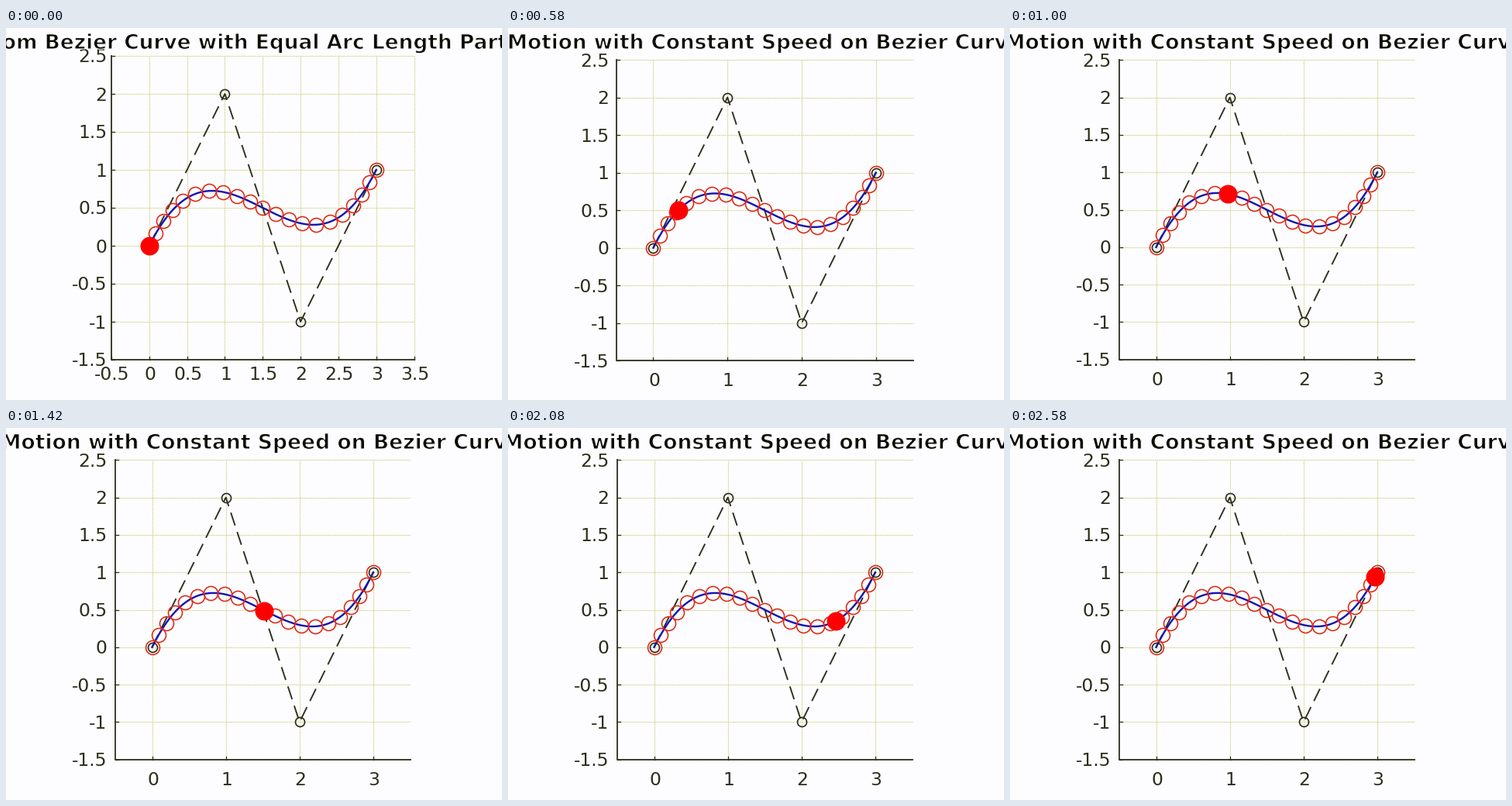
Animation, 640 px wide and 480 px high, one loop 2660 ms. Source, as a matplotlib script:

```python
import numpy as np
import matplotlib.pyplot as plt
from matplotlib.animation import FuncAnimation
from matplotlib.patheffects import Normal, Stroke

W, H, DPI = 640, 480, 100
LOOP_MS, TICK_MS = 2660, 20
POSE_MS = 250 / 3
PX = 72 / DPI  # points per pixel

BACK, INK, GRID = "#fdfdff", "#2e2e1c", "#d4d488"
BLUE, RING, BALL = "#1414b4", "#de2814", "#ff0000"
CONTROL = np.array([[0, 0], [1, 2], [2, -1], [3, 1]], float)

plt.rcParams["font.family"] = "DejaVu Sans"
fig = plt.figure(figsize=(W / DPI, H / DPI), dpi=DPI, facecolor=BACK)
ax = fig.add_axes([0, 0, 1, 1])
ax.set_xlim(0, W)
ax.set_ylim(H, 0)
ax.axis("off")

# Thins the bold title a little.
LIGHTER = [Normal(), Stroke(linewidth=1.1 * PX, foreground=BACK)]


def bezier(t):
    t = np.asarray(t, float)[..., None]
    s = 1 - t
    p0, p1, p2, p3 = CONTROL
    return s**3 * p0 + 3 * s**2 * t * p1 + 3 * s * t**2 * p2 + t**3 * p3


T = np.linspace(0, 1, 2001)
PATH = bezier(T)
ARC = np.concatenate([[0], np.cumsum(np.hypot(*np.diff(PATH, axis=0).T))])
ARC /= ARC[-1]


def at_length(part):
    """Point on the curve after the given share of its length."""
    return bezier(np.interp(part, ARC, T))


class Plot:
    """One layout of the chart; left, right, bottom, top are in pixels."""

    def __init__(self, box, title, title_x, title_px, step, label_y):
        self.left, self.right, self.bottom, self.top = box
        self.parts = []
        self.draw_axes(step, label_y)
        self.draw_curve()
        self.text(title_x, 27, title, title_px, "center", weight="bold",
                  color="#0c0c04", path_effects=LIGHTER)

    def pixel(self, points):
        x, y = np.asarray(points, float).T
        return (self.left + (x + 0.5) / 4 * (self.right - self.left),
                self.bottom + (y + 1.5) / 4 * (self.top - self.bottom))

    def line(self, x, y, color, width, **style):
        self.parts += ax.plot(x, y, color=color, lw=width * PX, **style)

    def text(self, x, y, label, size, align, **style):
        style.setdefault("color", INK)
        self.parts.append(ax.text(x, y, label, fontsize=size * PX, ha=align,
                                  va="baseline", **style))

    def rings(self, points, radius, color, width):
        x, y = self.pixel(points)
        self.line(x, y, color, 0, ls="", marker="o", ms=2 * radius * PX,
                  mfc="none", mew=width * PX)

    def draw_axes(self, step, label_y):
        l, r, b, t = self.left, self.right, self.bottom, self.top
        dots = dict(ls=(0, (1.2, 0.8)), dash_capstyle="butt")
        ticks_x = np.arange(-0.5, 3.6, 0.5) if step < 1 else np.arange(4)
        ticks_y = np.arange(-1.5, 2.6, 0.5)
        xs = self.pixel([(v, 0) for v in ticks_x])[0]
        ys = self.pixel([(0, v) for v in ticks_y])[1]
        for x in xs:
            self.line([x, x], [b, t], GRID, 1.2, **dots)
        for y in ys:
            self.line([l, r], [y, y], GRID, 1.2, **dots)
        self.line([l, l, r], [t, b, b], INK, 1.8)
        for x, v in zip(xs, ticks_x):
            self.line([x, x], [b, b - 4], INK, 1.3)
            self.text(x + 1, label_y, f"{v:g}", 23.5, "center")
        for y, v in zip(ys, ticks_y):
            self.line([l, l + 4], [y, y], INK, 1.3)
            self.text(130.5, y + 8.5, f"{v:g}", 23.5, "right")

    def draw_curve(self):
        self.line(*self.pixel(CONTROL), INK, 1.9, ls=(0, (9.2, 4.6)),
                  dash_capstyle="butt")
        self.line(*self.pixel(PATH), BLUE, 2.4)
        self.rings(at_length(np.linspace(0, 1, 21)), 9, RING, 1.6)
        self.rings(CONTROL, 6, INK, 1.7)

    def show(self, on):
        for part in self.parts:
            part.set_visible(on)


MOTION = "Motion with Constant Speed on Bezier Curve"
plots = [
    Plot((136, 526.5, 428, 36),
         "om Bezier Curve with Equal Arc Length Part", 320.5, 26.4, 0.5, 454),
    Plot((139.6, 522.6, 429.3, 41), MOTION, 330, 26.3, 1, 461.5),
    Plot((141, 521.5, 427.7, 41.3), MOTION, 329, 26.6, 1, 461),
]
ball, = ax.plot([], [], "o", color=BALL, ms=24 * PX, mew=0, zorder=5)

# Pace of the ball, in twentieths of the curve.
BEATS = [2, 7, 12, 17, 25, 31]
STEPS = [0, 3.25, 6.95, 10.13, 15.46, 19.62]


def update(tick):
    # Poses last 80 or 90 ms, so the clock runs finer than they do.
    pose = int(((tick + 0.5) * TICK_MS + 5) / POSE_MS)
    current = 0 if pose < 1 else 1 if pose < 12 else 2
    for i, plot in enumerate(plots):
        plot.show(i == current)
    part = np.interp(pose, BEATS, STEPS) / 20
    ball.set_data(*plots[current].pixel([at_length(part)]))
    return [ball]


anim = FuncAnimation(fig, update, frames=LOOP_MS // TICK_MS, interval=TICK_MS,
                     repeat=True, repeat_delay=0, blit=False)
plt.show()
```
